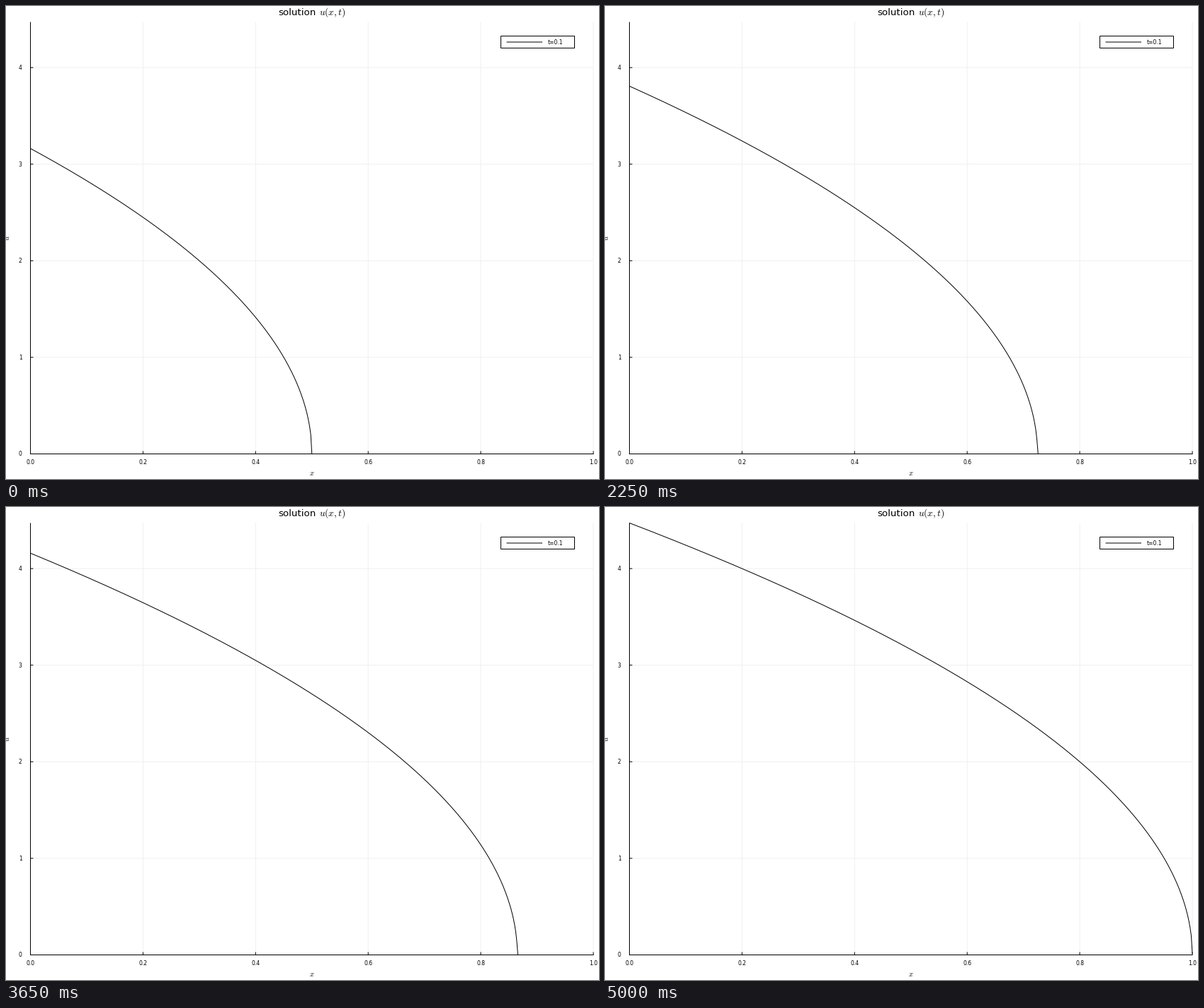
These frames come from a looping animation (837 by 669 pixels, 5050 ms). A matplotlib script:

```python
import numpy as np
import matplotlib.pyplot as plt
from matplotlib.animation import FuncAnimation
from matplotlib.patches import Rectangle

plt.rcParams["font.family"] = "DejaVu Sans"
plt.rcParams["mathtext.fontset"] = "cm"

W, H, DPI = 837, 669, 64
PT = 72 / DPI                      # points per pixel
LEFT, RIGHT, BASE = 34.5, 829.0, 633.5
UNIT = 136.6                       # pixels per unit of u
TOP = BASE - UNIT * np.sqrt(20)
FRAMES, INTERVAL = 101, 50
SMALL, GUIDE, TITLE = 7.66, 10.5, 13.4

fig = plt.figure(figsize=(W / DPI, H / DPI), dpi=DPI, facecolor="white")
ax = fig.add_axes([0, 0, 1, 1])
ax.set_xlim(0, W)
ax.set_ylim(H, 0)
ax.axis("off")


def px(x):
    return LEFT + (RIGHT - LEFT) * x


def py(u):
    return BASE - UNIT * u


def line(xs, ys, color="black", width=1.0, z=2):
    return ax.plot(xs, ys, color=color, lw=width * PT, zorder=z, snap=False,
                   solid_capstyle="butt", solid_joinstyle="round")[0]


def label(x, y, s, size, ha="center", va="baseline", **kw):
    ax.text(x, y, s, fontsize=size * PT, ha=ha, va=va, color="black", **kw)


# grid, ticks and tick labels
for x in np.linspace(0, 1, 6):
    line([px(x)] * 2, [TOP, BASE], "#f0f0f0", z=1)
    line([px(x)] * 2, [BASE, BASE - 4])
    label(px(x), 647.5, f"{x:.1f}", SMALL)
for u in range(5):
    line([LEFT, RIGHT], [py(u)] * 2, "#f0f0f0", z=1)
    line([LEFT, LEFT + 4], [py(u)] * 2)
    label(22.6, py(u) + 2.9, str(u), SMALL, ha="right")

# axes
line([LEFT, LEFT], [TOP, BASE + 0.5])
line([LEFT - 0.5, RIGHT + 0.5], [BASE, BASE])

# title and guides
label(384, 13, "solution", TITLE, ha="left")
label(441.7, 13, "$u(x,t)$", TITLE, ha="left")
label(431.7, 664, "$x$", GUIDE)
label(2, 328, "$u$", GUIDE, va="center", rotation=90)

# legend
ax.add_patch(Rectangle((698.5, 42.5), 104, 17, fc="white", ec="black",
                       lw=PT, zorder=3, snap=False))
line([706.5, 757], [51, 51], z=4)
label(765, 54, "t=0.1", SMALL, ha="left", zorder=4)

curve = line([], [], z=3)
grid = np.linspace(0, 1, 501)


def update(k):
    front = 0.5 + 0.005 * k
    # a trace of mass at the front keeps its foot just above zero
    eps = 1e-5 if k else 0.0
    u = np.sqrt(20 * np.clip(front - grid + eps, 0, None))
    end = np.searchsorted(grid, front + eps) + 1
    curve.set_data(px(grid[:end]), py(u[:end]))
    return (curve,)


def reset():
    return update(0)


anim = FuncAnimation(fig, update, frames=FRAMES, init_func=reset,
                     interval=INTERVAL, repeat=True, repeat_delay=0)
plt.show()
```
